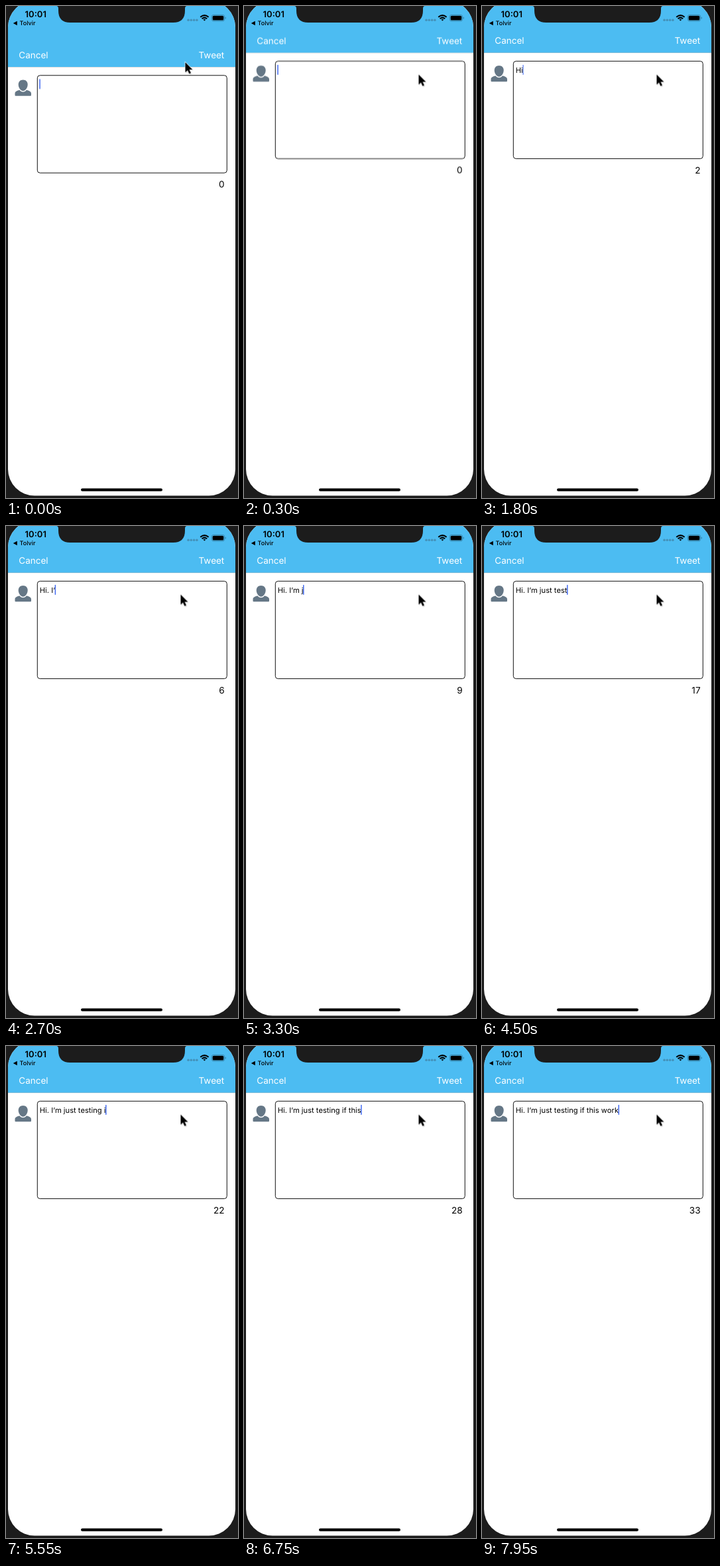
Animation, 350 px wide and 743 px high, one loop 8000 ms. Source, as an HTML page:

```html
<!DOCTYPE html>
<html lang="en">
<head>
<meta charset="utf-8">
<title>Compose screen</title>
<style>
  html, body { margin: 0; width: 100%; height: 100%; overflow: hidden; background: #1c1c1c; }
  svg { display: block; width: 350px; height: 743px; }
  text { font-family: Inter, Roboto, sans-serif; text-rendering: geometricPrecision; white-space: pre; }
  .nav { font-size: 13.5px; fill: #fff; }
  .end { text-anchor: end; }
  #count { font-size: 13.6px; }
  #typed { font-size: 11.2px; }
  #page, #pointer, #caret { animation: 8s step-end infinite; }
  #page { animation-name: settle; }
  #pointer { animation-name: point; }
  #caret { animation-name: blink; }
  @keyframes settle {
    0% { transform: translateY(21.5px); }
    1.875% { transform: translateY(8px); }
    3.75%, 100% { transform: none; }
  }
  @keyframes point {
    0% { transform: translate(270.5px, 85px); }
    1.875% { transform: translate(266px, 96px); }
    3.75%, 100% { transform: translate(263.5px, 103.5px); }
  }
  @keyframes blink {
    0% { opacity: 1; }
    5.625% { opacity: .5; }
    7.5% { opacity: 0; }
    11.25% { opacity: .5; }
    13.125% { opacity: 1; }
    22.5% { opacity: .75; }
    24.375%, 100% { opacity: 1; }
  }
</style>
</head>
<body>
<svg viewBox="0 0 350 743">
  <clipPath id="screen"><rect x="3" y="-8" width="343" height="747.5" rx="40"/></clipPath>
  <g clip-path="url(#screen)">
    <rect width="350" height="743" fill="#fff"/>
    <g id="page">
      <rect y="-40" width="350" height="111" fill="#000" opacity=".25"/>
      <rect y="-40" width="350" height="110.5" fill="#4cbcf2"/>
      <text class="nav" x="19.3" y="57">Cancel</text>
      <text class="nav end" x="329.3" y="57">Tweet</text>
      <g fill="#657786">
        <path d="M25.7 90c4.300 0 7 2.800 7 7 0 4.500-3 9.700-7 9.700s-7-5.200-7-9.700c0-4.200 2.700-7 7-7z"/>
        <path d="M20.300 105.300c1.500 2 3.300 3 5.400 3s3.900-1 5.400-3c2.800 1.200 6.700 2 6.900 5v3q0 1-1 1H14.500q-1 0-1-1v-3c.2-3 4-3.800 6.800-5z"/>
      </g>
      <rect x="47.300" y="83.300" width="286" height="147.300" rx="4" fill="#fff" stroke="#111"/>
      <text id="typed" x="50.800" y="100.900"></text>
      <rect id="caret" x="50.300" y="88.700" width="1.500" height="15.200" rx=".7" fill="#426bf2"/>
      <text id="count" class="end" x="329.600" y="252.600">0</text>
    </g>

    <text x="28.600" y="16.700" font-size="13" font-weight="600">10:01</text>
    <path d="M10.800 26l6-3.200v6.400z"/>
    <text x="20.600" y="29.300" font-size="9" font-weight="500">Tolvir</text>
    <g fill="#3f7593" opacity=".6">
      <circle cx="275" cy="21.300" r="1.800"/><circle cx="279.300" cy="21.300" r="1.800"/>
      <circle cx="283.600" cy="21.300" r="1.800"/><circle cx="287.900" cy="21.300" r="1.800"/>
    </g>
    <g fill="none" stroke="#000" stroke-width="2">
      <path d="M293.200 16.700q6.200-5.200 12.400 0"/>
      <path d="M295.600 19.200q3.800-3.200 7.600 0"/>
      <path d="M297.500 20.600q1.900-1.500 3.800 0l-1.900 2z" fill="#000" stroke="none"/>
    </g>
    <rect x="310.400" y="13.400" width="19.200" height="9.400" rx="2.600" fill="none" stroke="#2c6583" stroke-width=".9" opacity=".65"/>
    <rect x="311.700" y="14.700" width="16.600" height="6.800" rx="1.500"/>
    <path d="M330.700 16.500q1.300.4 1.300 1.600t-1.300 1.600z" fill="#2c6583" opacity=".65"/>
    <rect x="113" y="728.500" width="123" height="4.300" rx="2.150"/>
  </g>
  <path d="M76 0q3 0 3 4v3q0 18 18 18h155q18 0 18-18V4q0-4 3-4z" fill="#1c1c1c"/>
  <g id="pointer">
    <path d="M.8 1.500v15.300l3.600-3.300 2.500 5.500 2.700-1.200-2.400-5.300h4.900z" fill="#000" opacity=".18"/>
    <path d="M0 0v15.200l3.500-3.300 2.400 5.500 2.600-1.100-2.400-5.400h4.800z" stroke="#fff" stroke-width="1.300" paint-order="stroke"/>
  </g>
</svg>
<script>
  const LOOP = 8000;
  const MESSAGE = "Hi. I’m just testing if this work";
  // When each character of the message lands, in ms.
  const KEYS = [
    1050, 1350, 1950, 2100, 2400, 2700, 3000, 3150, 3300, 3450, 3600,
    3750, 3900, 4050, 4200, 4350, 4500, 4650, 4950, 5100, 5250, 5550,
    5700, 5850, 6150, 6300, 6600, 6750, 6900, 7200, 7500, 7800, 7950
  ];
  const [typed, caret, count] = ["typed", "caret", "count"].map(id => document.getElementById(id));
  const start = performance.now();

  function draw() {
    const t = (performance.now() - start) % LOOP;
    const n = KEYS.filter(key => key <= t).length;
    typed.textContent = MESSAGE.slice(0, n).replaceAll(" ", "\u00a0");
    caret.setAttribute("x", 50.3 + (n ? typed.getComputedTextLength() : 0));
    count.textContent = n;
    requestAnimationFrame(draw);
  }
  draw();
</script>
</body>
</html>
```
